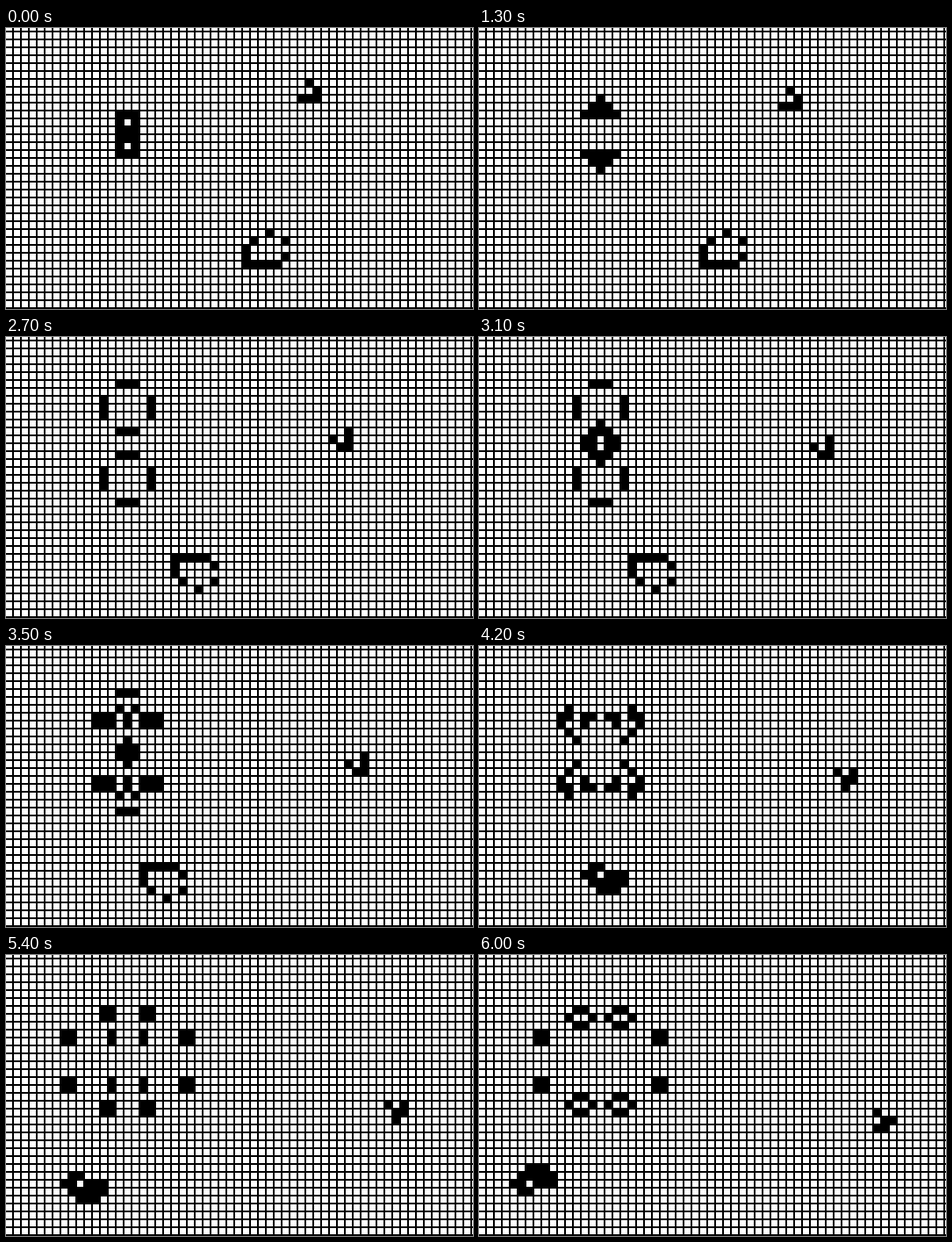
Write an HTML page with a canvas that moves like this. It is 532x320 px and loops after 6.1 s.

```html
<!DOCTYPE html>
<html lang="en">
<head>
<meta charset="utf-8">
<title>Game of Life</title>
<style>
  html, body { margin: 0; width: 100%; height: 100%; overflow: hidden; background: #fff; }
  canvas { display: block; }
</style>
</head>
<body>
<canvas id="stage" width="532" height="320"></canvas>
<script>
const ctx = document.getElementById('stage').getContext('2d');
const COLS = 60, ROWS = 36;
const PITCH = 9, CELL = 7, TOP = 5;
const HOLD = 1000, STEP = 100, LOOP = 6100;
const GENERATIONS = (LOOP - HOLD) / STEP + 1;

const patterns = [
  { col: 14, row: 10, rows: ['OOO', 'O.O', 'OOO', 'OOO', 'O.O', 'OOO'] },
  { col: 37, row: 6, rows: ['.O.', '..O', 'OOO'] },
  { col: 30, row: 25, rows: ['...O..', '.O...O', 'O.....', 'O....O', 'OOOOO.'] }
];

const emptyGrid = () => Array.from({ length: ROWS }, () => new Uint8Array(COLS));

function seed() {
  const grid = emptyGrid();
  for (const { col, row, rows } of patterns)
    rows.forEach((line, y) => [...line].forEach((ch, x) => {
      if (ch === 'O') grid[row + y][col + x] = 1;
    }));
  return grid;
}

function neighbours(grid, x, y) {
  let n = -grid[y][x];
  for (let j = y - 1; j <= y + 1; j++)
    for (let i = x - 1; i <= x + 1; i++)
      n += grid[j]?.[i] || 0;
  return n;
}

function evolve(grid) {
  return grid.map((line, y) => line.map((alive, x) => {
    const n = neighbours(grid, x, y);
    return n === 3 || (alive && n === 2) ? 1 : 0;
  }));
}

const history = [seed()];
while (history.length < GENERATIONS) history.push(evolve(history.at(-1)));

// Empty cells are white squares; the black behind them forms the grid lines.
function draw(grid) {
  ctx.fillStyle = '#000';
  ctx.fillRect(0, 0, 532, 320);
  ctx.fillStyle = '#fff';
  for (let y = -1; y < ROWS; y++)
    for (let x = 0; x < COLS; x++)
      if (!grid[y]?.[x]) ctx.fillRect(x * PITCH, TOP + y * PITCH, CELL, CELL);
}

let shown = -1;
function tick() {
  const t = performance.now() % LOOP;
  const gen = t < HOLD ? 0 : Math.floor((t - HOLD) / STEP) + 1;
  if (gen !== shown) draw(history[shown = gen]);
  requestAnimationFrame(tick);
}
tick();
</script>
</body>
</html>
```
